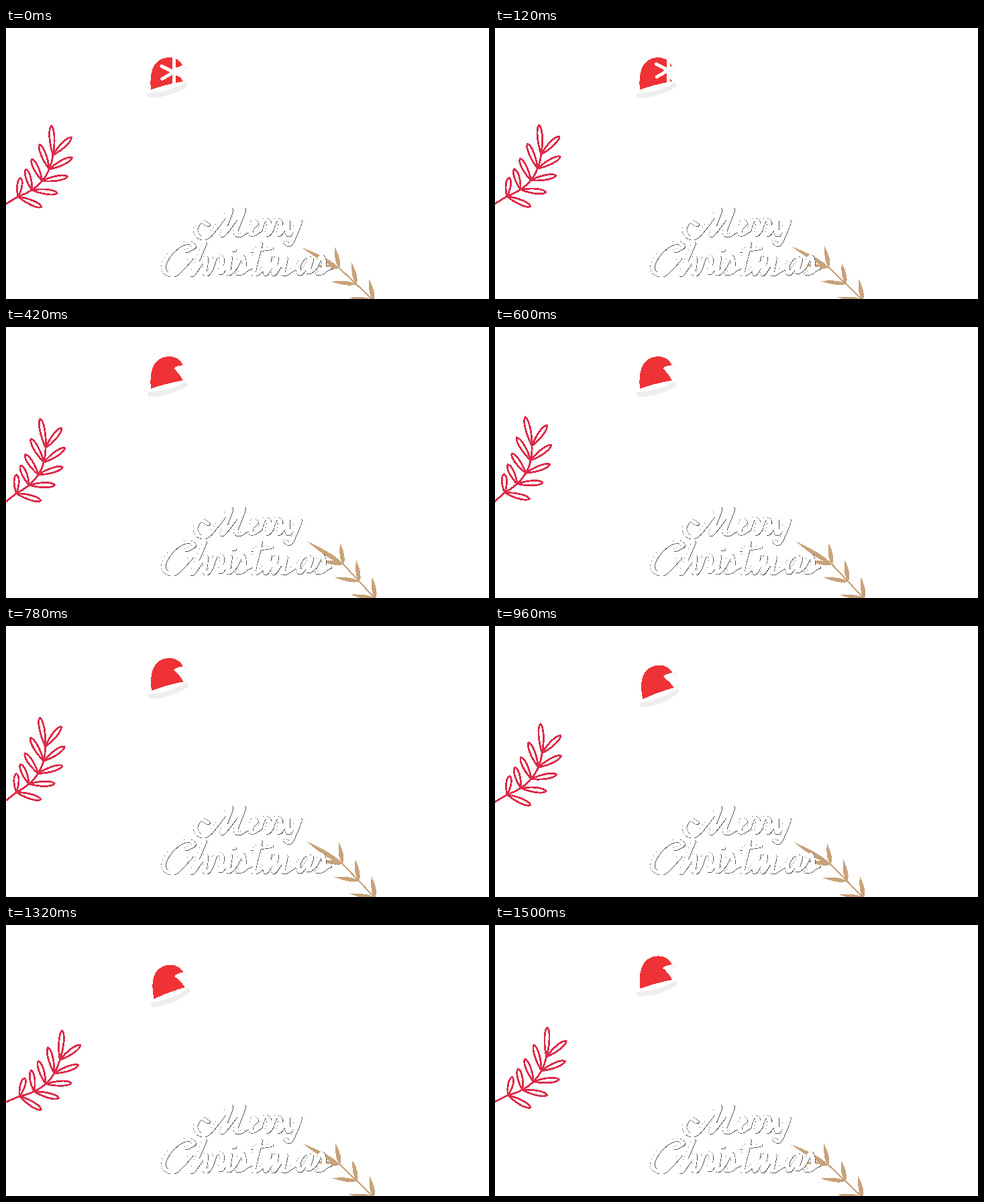
These frames come from a looping animation (720x405 px, 1.53 s). An HTML page:

```html
<!DOCTYPE html>
<html lang="en">
<head>
<meta charset="utf-8">
<title>Merry Christmas</title>
<style>
  html, body { margin: 0; width: 100%; height: 100%; overflow: hidden; background: #fff; }
  svg { display: block; width: 720px; height: 405px; shape-rendering: crispEdges; }
  path { stroke-linecap: round; stroke-linejoin: round; }
  .line { fill: none; }
</style>
</head>
<body>
<svg viewBox="0 0 720 405" role="img" aria-label="Merry Christmas">
  <g id="hat">
    <path fill="#ef3236" d="M216 92C214 72 217 57 227 49C240 40 258 43 264 57C259 58 253 58 250 62C256 67 261 74 264 80C248 82 231 87 216 92Z"/>
    <path fill="#eee" d="M211 97C232 97 255 90 268 81C271 83 271 86 270 88C256 98 232 105 214 104C211 103 210 100 211 97Z"/>
    <path class="line" stroke="#e4e4e4" d="M265 61C268 62 270 60 270 57"/>
  </g>
  <path id="flake" class="line" stroke="#fff" stroke-width="5" d="M0-22V22M-18-9L18 9M-17 10L17-10"/>
  <g id="berry" class="line" stroke="#dc2b49" stroke-width="2.8">
    <path d="M-12 270L18 252Q64 236 70 190"/>
  </g>
  <g id="wheat" fill="#c8a27a">
    <path class="line" stroke="#c8a27a" stroke-width="2.2" d="M497 359L554 413"/>
  </g>
  <g id="lettering" class="line"></g>
</svg>
<script>
const LOOP = 1530, STEP = 30;
const $ = id => document.getElementById(id);

function addPath(group, attrs) {
  const path = document.createElementNS("http://www.w3.org/2000/svg", "path");
  for (const name in attrs) path.setAttribute(name, attrs[name]);
  group.append(path);
}

// Pointed leaf growing from (x, y) by (dx, dy); near and far place its bulge.
function addLeaf(group, x, y, dx, dy, width, near, far) {
  const len = Math.hypot(dx, dy);
  const at = (k, side) =>
    `${x + dx * k - dy / len * width * side} ${y + dy * k + dx / len * width * side}`;
  addPath(group, {
    d: `M${x} ${y}C${at(near, 1)} ${at(far, 1)} ${x + dx} ${y + dy}` +
       `C${at(far, -1)} ${at(near, -1)} ${x} ${y}Z`
  });
}

// Five pairs of leaves along the curved stem.
for (let i = 0; i < 5; i++) {
  const k = i / 4;
  const along = (a, b, c) => a * (1 - k) ** 2 + 2 * b * k * (1 - k) + c * k * k;
  const grow = (degrees, length) => {
    const angle = degrees * Math.PI / 180;
    addLeaf($("berry"), along(18, 64, 70), along(252, 236, 190),
      length * Math.cos(angle), -length * Math.sin(angle), 4.8, .45, .9);
  };
  grow(116 - 7 * (i - 2.2) ** 2, 28 + 4 * i);
  grow(17 * i - 24, 38);
}

// Three nodes with an upright and a side leaf each, and one long end leaf.
addLeaf($("wheat"), 497, 359, -56, -31, 4.5, .2, .5);
for (let i = 0; i < 3; i++) {
  const x = 497 + 25.5 * i, y = 359 + 24 * i;
  addLeaf($("wheat"), x, y, -7, -32, 4.5, .2, .5);
  addLeaf($("wheat"), x, y, -38, -4, 4, .2, .5);
}

// Pen strokes as points (x, height over baseline); the first stroke's end starts the next letter.
const GLYPHS = {
  M: "27 20 14 26 5 11 14 -3 30 2 67 47 52 1 89 47 76 9 82 1 96 10",
  C: "38 36 49 42 42 48 26 43 10 27 4 8 20 0 44 24",
  a: "25 23 15 27 6 14 9 2 25 24 20 4 30 10",
  e: "0 8 15 21 10 26 7 3 22 10",
  h: "21 47 2 0 22 26 21 4 25 1 31 10",
  i: "0 10 8 26 5 2 15 10/13 37 14 37",
  m: "0 12 8 27 2 1 18 26 14 1 31 26 28 5 31 1 45 10",
  r: "0 10 7 28 16 24 13 3 20 10",
  s: "0 10 11 28 14 6 4 2 22 10",
  t: "0 10 16 47 6 2 22 10/4 36 32 40",
  y: "0 10 9 26 10 2 30 26 14 -13 5 -11"
};

// Smooth curve through all points.
function curve(points) {
  let d = "M" + points[0];
  for (let i = 1; i < points.length; i++) {
    const b = points[i - 1], c = points[i];
    const a = points[i - 2] || b, e = points[i + 1] || c;
    d += "C" + [b.map((v, n) => v + (c[n] - a[n]) / 6), c.map((v, n) => v - (e[n] - b[n]) / 6), c];
  }
  return d;
}

function write(word, x, baseline, scale) {
  let d = "";
  for (const letter of word) {
    const strokes = GLYPHS[letter].split("/").map(stroke => {
      const v = stroke.split(" ").map(Number), points = [];
      for (let i = 0; i < v.length; i += 2)
        points.push([x + v[i] * scale, baseline - v[i + 1] * scale]);
      return points;
    });
    d += strokes.map(curve).join("");
    x = strokes[0].at(-1)[0];
  }
  return d;
}

// A broad nib: the same strokes side by side, dark edge first, white on top.
const words = write("Merry", 278, 311, .85) + write("Christmas", 231, 369, 1);
for (const [stroke, width, shift] of [["#555", 5, .3], ["#fff", 4, 0]])
  for (const nib of [-1.2, 0, 1.2])
    addPath($("lettering"), {
      d: words, stroke, "stroke-width": width, transform: `translate(${nib + shift} ${shift})`
    });

// Eased value between [time, value] keys.
function track(t, keys) {
  const i = Math.max(1, keys.findIndex(([time]) => time >= t));
  const [t0, a] = keys[i - 1], [t1, b] = keys[i];
  const k = Math.max(0, (t - t0) / (t1 - t0));
  return a + (b - a) * (1 - Math.cos(Math.PI * k)) / 2;
}

const swings = [
  { el: $("hat"), pivot: "384 60", keys: [[630, 0], [1170, -8.9], [1590, 0]] },
  { el: $("berry"), pivot: "-9 270", keys: [[0, 0], [640, -10], [1240, 8.3], [1840, 0]] },
  { el: $("wheat"), pivot: "564 450", keys: [[0, 0], [430, 3.7], [1650, 0]] }
];

function draw(now) {
  const t = Math.floor(now % LOOP / STEP) * STEP;
  for (const { el, pivot, keys } of swings)
    el.setAttribute("transform", `rotate(${track(t, keys)} ${pivot})`);
  $("flake").setAttribute("transform", `translate(${250 + t * .07} ${66 - t * .025})`);
}

const start = performance.now();
function tick() {
  draw(performance.now() - start);
  requestAnimationFrame(tick);
}
tick();
</script>
</body>
</html>
```
